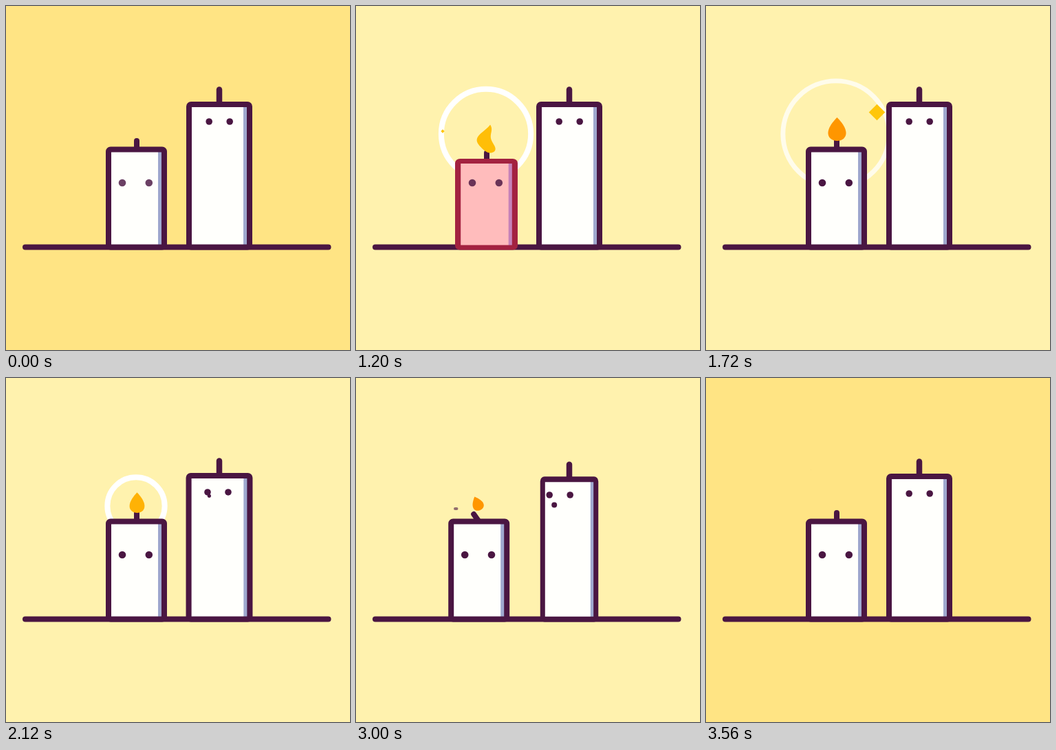
An HTML page with a canvas for the animation above (3.6 s loop, 500 by 500 pixels).

```html
<!DOCTYPE html>
<html lang="en">
<head>
<meta charset="utf-8">
<title>Two candles</title>
<style>
html, body { margin: 0; width: 100%; height: 100%; overflow: hidden; background: #ffe484; }
canvas { display: block; }
</style>
</head>
<body>
<canvas id="stage" width="500" height="500"></canvas>
<script>
const ctx = document.getElementById('stage').getContext('2d');
const LOOP = 3600, TAU = 2 * Math.PI, FLOOR = 354.5;
const INK = [74, 22, 66], RED = [163, 34, 64];
const GLOWS = [981, 1398, 2043]; // start times of the light waves

const lerp = (a, b, p) => a + (b - a) * p;
const mix = (a, b, p) => `rgb(${a.map((v, i) => Math.round(lerp(v, b[i], p)))})`;
const ink = mix(INK, INK, 0);

// Smooth step from 0 to 1 between two times
function ease(t, from, to) {
  const p = Math.max(0, Math.min(1, (t - from) / (to - from)));
  return p * p * (3 - 2 * p);
}
// Rises to 1, stays, and falls back to 0
const hold = (t, a, b, c, d) => ease(t, a, b) - ease(t, c, d);

function line(color, width, ...points) {
  ctx.beginPath();
  for (let i = 0; i < points.length; i += 2) ctx.lineTo(points[i], points[i + 1]);
  ctx.strokeStyle = color;
  ctx.lineWidth = width;
  ctx.lineCap = ctx.lineJoin = 'round';
  ctx.stroke();
}

function dot(x, y, r, alpha = 1) {
  ctx.globalAlpha = alpha;
  ctx.fillStyle = ink;
  ctx.beginPath();
  ctx.arc(x, y, Math.max(0, r), 0, TAU);
  ctx.fill();
  ctx.globalAlpha = 1;
}

// Wax block standing on the floor, scaled with its outline
function body(x, w, h, sx, sy, red) {
  ctx.save();
  ctx.translate(x, FLOOR);
  ctx.scale(sx, sy);
  ctx.beginPath();
  ctx.roundRect(4 - w / 2, 4 - h, w - 8, h - 8, 3);
  ctx.fillStyle = mix([255, 255, 252], [255, 188, 188], red);
  ctx.fill();
  ctx.fillStyle = mix([159, 168, 207], [197, 130, 185], red);
  ctx.fillRect(w / 2 - 13, 5 - h, 6, h - 10);
  ctx.strokeStyle = mix(INK, RED, red);
  ctx.lineWidth = 8;
  ctx.stroke();
  ctx.restore();
}

function ring(t) {
  const age = (t - GLOWS.findLast(s => t >= s)) / 500;
  if (!(age < 1)) return;
  const r = 96 * age ** 0.4;
  const fade = Math.max(0, (r - 69) / 11);
  const w = Math.min(8 - fade, r);
  ctx.beginPath();
  ctx.arc(189, 186, r - w / 2, 0, TAU);
  ctx.strokeStyle = `rgba(255,255,255,${1 - 0.23 * fade})`;
  ctx.lineWidth = w;
  ctx.stroke();
}

function spark(age, x, y) {
  const r = 16 * (1 - Math.abs(age - 370) / 180);
  if (r <= 0) return;
  ctx.save();
  ctx.translate(x, y);
  ctx.rotate(TAU / 8);
  ctx.scale(r * Math.SQRT2, r * Math.SQRT2);
  ctx.fillStyle = '#ffc60a';
  ctx.fillRect(-0.5, -0.5, 1, 1);
  ctx.restore();
}

function flame(t, top, bend) {
  const size = ease(t, 970, 1100) - 0.38 * ease(t, 2860, 3000) - 0.62 * ease(t, 3000, 3060);
  const leaf = 1 - ease(t, 1220, 1420);
  const beat = 0.5 + 0.5 * Math.cos((t - 1720) / 304 * TAU);
  const swell = Math.max(beat, leaf, bend);
  ctx.save();
  ctx.translate(190.5 - 10 * bend, top - 8.5 - 4 * bend);
  ctx.rotate(-0.4 * bend);
  ctx.scale(size * lerp(0.77, 1, swell), size * lerp(0.82, 1, swell));
  ctx.fillStyle = mix([255, 190, 7], [255, 150, 0], Math.max(beat, bend) * (1 - leaf));
  // Teardrop whose spine curls while it is a leaf
  ctx.beginPath();
  for (let a = -Math.PI; a < Math.PI; a += 0.1) {
    const v = Math.sin(a / 2) ** 2;
    const x = (16.9 - 2.5 * leaf) * Math.sin(a) * Math.cos(a / 2);
    ctx.lineTo(x + 4.5 * leaf * Math.cos(TAU * v), -(34 + 7 * leaf) * v);
  }
  ctx.fill();
  ctx.restore();
}

function smallCandle(t) {
  const red = hold(t, 260, 600, 1360, 1600);
  const squash = hold(t, 240, 960, 1220, 1480);
  const bend = hold(t, 2840, 3000, 3060, 3280);
  const shake = t > 440 && t < 960 ? Math.sin((t - 680) * Math.PI / 80) : 0;
  const x = 189.5 + shake - 10.8 * bend;
  const sy = 1 - 0.117 * squash;
  const top = FLOOR - 150 * sy;

  const wick = mix(INK, RED, red * (1 - ease(t, 900, 980)));
  line(wick, 8, x + 0.5 - 2 * bend, top + 2, x + 0.5 - 8 * bend, top - 8.5 + 2 * bend);
  flame(t, top, bend);
  body(x, 89, 150, 1 + 0.022 * red, sy, red);

  if (t > 300 && t < 1040) {
    const y = top + 54;
    for (const side of [-1, 1]) {
      const ex = x - 0.8 + 21.3 * side;
      line('#f80024', 3, ex + 3.5 * side, y - 7, ex - 4 * side, y, ex + 3.5 * side, y + 7);
    }
  } else {
    const alpha = t < 300 ? 0.82 : ease(t, 1040, 1260);
    for (const side of [-1, 1]) dot(x - 1.1 + 19.4 * side, 257, 5.3, alpha);
  }
}

function tallCandle(t) {
  const gasp = hold(t, 2000, 2440, 2740, 2920);
  const blow = hold(t, 2740, 2920, 3040, 3320);
  const sy = 1 + 0.024 * gasp - 0.02 * blow;
  const top = FLOOR - 215.5 * sy;
  line(ink, 8.5, 310, top + 3, 310, top - 17.5);
  body(310, 96, 215.5, 1 + 0.052 * gasp - 0.12 * blow, sy, 0);

  const x = 295.2 - 12 * gasp - 14 * blow;
  const y = 168 - 11 * gasp + 2 * blow;
  dot(x, y, 4.8);
  dot(x + 30, y, 4.8);
  dot(x + 13 * gasp + 7 * blow, y + 29 * gasp + 14.5 * blow, 14 * gasp + 4 * blow);
}

// Breath streak, then a puff rising from the wick
function smoke(t) {
  if (t > 2840 && t < 3040) {
    const head = lerp(250, 144, ease(t, 2840, 2960));
    const tail = lerp(250, 144, ease(t, 2880, 3010));
    ctx.globalAlpha = 0.6;
    line(ink, 4, head, 190, tail + 1, 190);
    ctx.globalAlpha = 1;
  }
  const rise = (t - 3060) / 510;
  if (rise > 0 && rise < 1)
    dot(lerp(168, 152, rise), lerp(188, 133, rise), 8 * (1 - rise) * Math.min(1, rise * 8), 0.6);
}

function draw(t) {
  ctx.fillStyle = mix([255, 228, 132], [255, 242, 174], hold(t, 960, 1060, 3050, 3120));
  ctx.fillRect(0, 0, 500, 500);
  ring(t);
  line(ink, 8, 28, 350.5, 468.5, 350.5);
  GLOWS.forEach((s, i) => i ? spark(t - s, 248.5, 154.5) : spark(t - s, 126, 182));
  smallCandle(t);
  tallCandle(t);
  smoke(t);
}

const begin = performance.now();
function frame() {
  draw((performance.now() - begin) % LOOP);
  requestAnimationFrame(frame);
}
frame();
</script>
</body>
</html>
```
